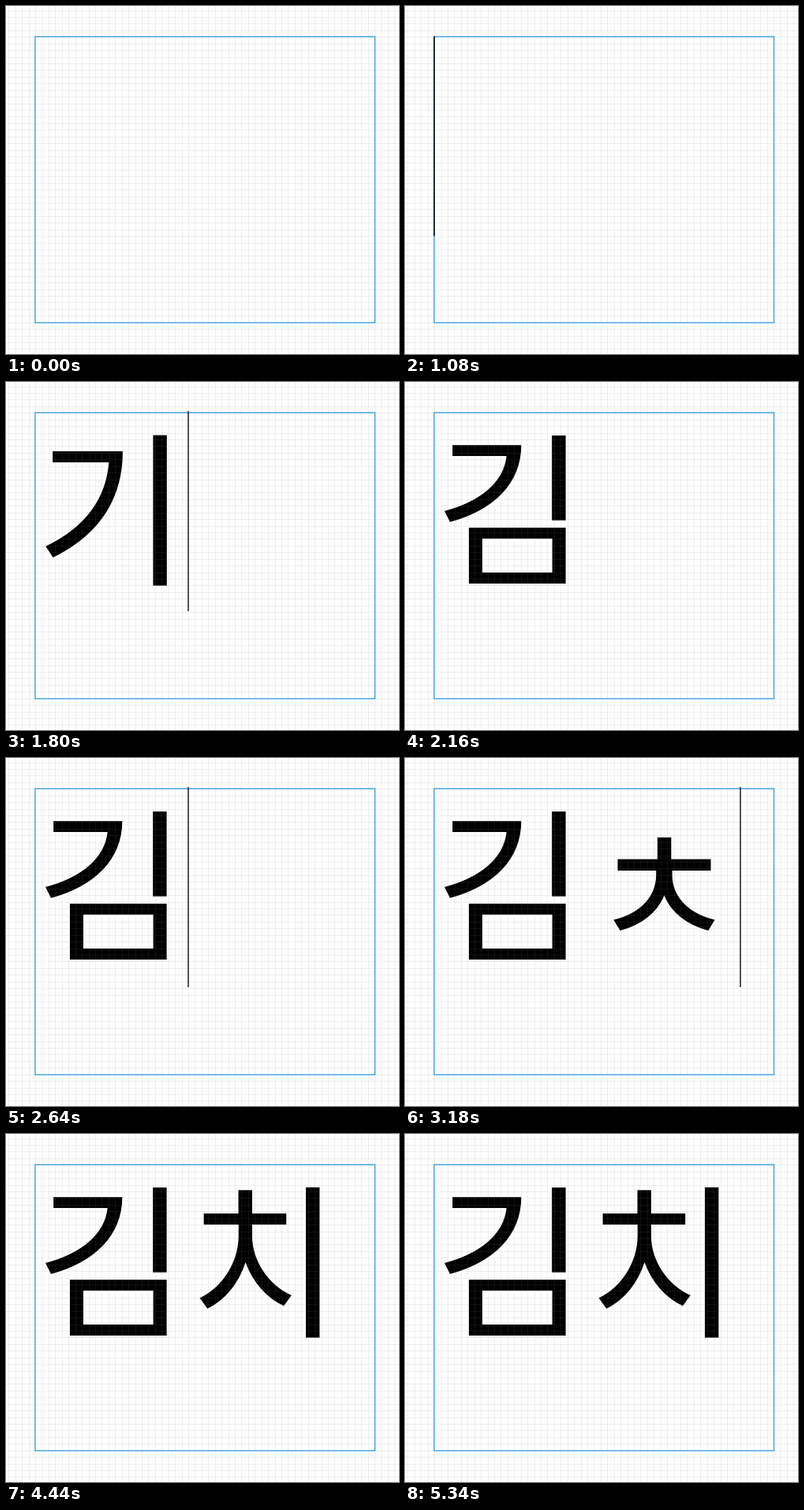
Recreate the animation shown at these times as an HTML page with a canvas. Size 498x442 px, loop 5.4 s.

```html
<!DOCTYPE html>
<html lang="ko">
<head>
<meta charset="utf-8">
<title>Typing on an artboard</title>
<style>
  html, body { margin: 0; width: 100%; height: 100%; overflow: hidden; background: #fefefe; }
  canvas { display: block; width: 498px; height: 442px; }
</style>
</head>
<body>
<canvas id="stage" width="498" height="442"></canvas>
<script>
const W = 498, H = 442, LOOP = 5400;
const ctx = document.getElementById('stage').getContext('2d');

const SIZE = 210, BASELINE = 241.9, TEXT_X = 37.5, CARET_X = 37, ADVANCE = 194;
const GRID = { x: 3.4, y: 5.55, step: 59 / 7 };

// Text as each key is pressed: [time, text]
const typed = [
  [0, ''], [1320, 'ㄱ'], [1740, '기'], [2160, '김'], [3120, '김ㅊ'], [3480, '김치']
];

// Times when the caret turns on or off, starting from off
const blinks = [240, 600, 1080, 2160, 2640, 3540, 3960, 4380, 4860, 5220];

function textAt(t) {
  return typed.filter(([start]) => start <= t).pop()[1];
}

function caretOn(t) {
  return blinks.filter(start => start <= t).length % 2 === 1;
}

function drawText(text) {
  ctx.fillStyle = '#000';
  ctx.font = `400 ${SIZE}px "Noto Sans CJK KR", "Noto Sans CJK", "Noto Sans CJK JP", sans-serif`;
  ctx.textBaseline = 'alphabetic';
  [...text].forEach((ch, i) => ctx.fillText(ch, TEXT_X + i * ADVANCE, BASELINE));
}

// The grid lies over the letters, so it shows faintly on black too
function drawGrid() {
  ctx.fillStyle = 'rgba(128, 128, 128, 0.12)';
  for (let x = GRID.x; x < W; x += GRID.step) ctx.fillRect(Math.round(x), 0, 1, H);
  for (let y = GRID.y; y < H; y += GRID.step) ctx.fillRect(0, Math.round(y), W, 1);
}

function drawFrame() {
  ctx.lineWidth = 1.4;
  ctx.strokeStyle = '#3ea2e0';
  ctx.strokeRect(36.9, 38.9, 430.6, 363.4);
}

function drawCaret(count) {
  if (count) {
    ctx.fillStyle = '#111';
    ctx.fillRect(CARET_X - 0.7 + count * ADVANCE, 37, 1.4, 254);
  } else {
    ctx.fillStyle = '#0f2a3d';
    ctx.fillRect(CARET_X - 0.9, 38.5, 1.9, 253.5);
  }
}

function draw(t) {
  const text = textAt(t);
  ctx.fillStyle = '#fefefe';
  ctx.fillRect(0, 0, W, H);
  drawText(text);
  drawGrid();
  drawFrame();
  if (caretOn(t)) drawCaret(text.length);
}

const start = performance.now();
function tick(now) {
  draw(Math.max(0, now - start) % LOOP);
  requestAnimationFrame(tick);
}
draw(0);
requestAnimationFrame(tick);
</script>
</body>
</html>
```
